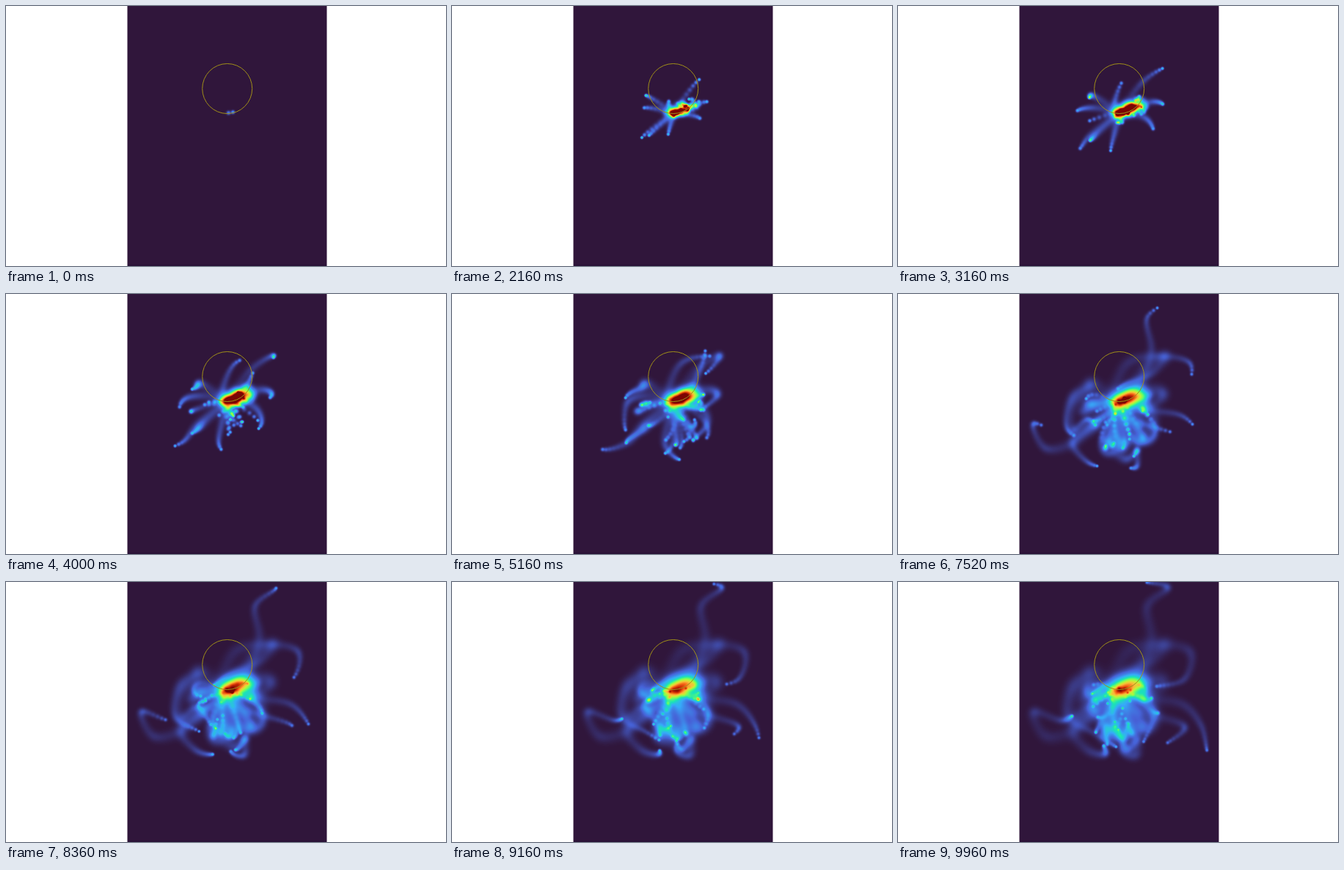
An HTML page with a canvas that plays this animation: 600x354 px, repeating every 10 s.

```html
<!DOCTYPE html>
<html>
<head>
<meta charset="utf-8">
<style>
html, body { margin: 0; width: 100%; height: 100%; overflow: hidden; background: #fff; }
canvas { display: block; }
</style>
</head>
<body>
<canvas id="stage" width="600" height="354"></canvas>
<script>
const ctx = document.getElementById('stage').getContext('2d');
const LEFT = 166, W = 271, H = 354, LOOP = 10, STEP = 0.2;
const NEST = [302, 145], START = 0.36, KNOT = 1.6;

// Explorers: x, y of each ant every 1.6 s after leaving the nest
const routes = [
  [262,175, 239,202, 201,210, 184,176, 221,188, 237,182],
  [317,138, 333,114, 345,75, 339,32, 368,7, 338,0],
  [295,130, 313,93, 355,84, 398,94, 390,132, 350,142],
  [333,103, 365,83, 345,108, 310,122, 283,140, 264,152],
  [312,140, 316,150, 345,158, 388,166, 413,195, 421,230],
  [302,150, 308,163, 318,172, 353,182, 391,197, 365,220],
  [270,174, 258,186, 237,203, 259,229, 282,234, 280,222],
  [263,138, 238,148, 237,186, 259,170, 280,196, 285,222],
  [266,122, 258,127, 236,141, 230,183, 263,203, 297,224],
  [345,130, 362,137, 338,158, 333,155, 349,180, 334,218],
  [337,152, 348,176, 327,202, 325,235, 305,228, 315,190],
  [295,171, 290,205, 310,225, 326,212, 312,228, 300,200]
];

let seed = 11;
const random = () => (seed = seed * 16807 % 2147483647) / 2147483647;

function spline(a, b, c, d, u) {
  return b + u / 2 * (c - a + u * (2 * a - 5 * b + 4 * c - d + u * (3 * (b - c) + d - a)));
}

const deposits = [[303, 145, -0.3], [309, 144, -0.2]];

routes.forEach((route, n) => {
  const flat = NEST.concat(route);
  const knot = (i, axis) => flat[Math.max(0, Math.min(6, i)) * 2 + axis];
  for (let t = START + (n * 0.618 % 1) * STEP; t < LOOP; t += STEP) {
    const s = (t - START) / KNOT, i = Math.min(5, Math.floor(s));
    const at = axis => spline(knot(i - 1, axis), knot(i, axis), knot(i + 1, axis), knot(i + 2, axis), s - i);
    deposits.push([at(0), at(1), t]);
  }
});

// Foragers: looping trips out of the nest and back
for (let n = 0; n < 18; n++) {
  const home = NEST[0] + (random() - 0.5) * 20;
  let begin = 0.4 + n * 0.09, t = begin;
  for (let trip = 0; begin < LOOP; trip++) {
    const angle = trip ? random() * 3.6 - 0.3 : -0.35 + (random() - 0.5) * 0.6;
    const reach = trip ? 25 + random() * 15 + 35 * Math.max(0, Math.sin(angle)) : 22 + random() * 8;
    const bend = (random() - 0.5) * reach * 0.5, duration = reach / 14;
    for (; t < Math.min(begin + duration, LOOP); t += STEP) {
      const f = (t - begin) / duration;
      const out = reach * Math.sin(Math.PI * f), side = bend * Math.sin(2 * Math.PI * f);
      deposits.push([
        home + out * Math.cos(angle) - side * Math.sin(angle),
        NEST[1] + out * Math.sin(angle) + side * Math.cos(angle),
        t
      ]);
    }
    begin += duration;
  }
}

// Rainbow heat scale, packed as opaque little-endian pixels
const stops = [0x30163b, 0x4662d7, 0x36aaf9, 0x1ae4b6, 0x72fe5e, 0xc8ef34, 0xfaba39, 0xf66b19, 0xcb2a04, 0x7a0403];
const palette = Uint32Array.from({ length: 512 }, (_, k) => {
  const s = k / 512 * 9, i = Math.floor(s);
  const mix = shift => {
    const a = stops[i] >> shift & 255, b = stops[i + 1] >> shift & 255;
    return Math.round(a + (b - a) * (s - i));
  };
  return (255 << 24 | mix(0) << 16 | mix(8) << 8 | mix(16)) >>> 0;
});

const heat = new Float32Array(W * H);
const image = ctx.createImageData(W, H);
const pixels = new Uint32Array(image.data.buffer);
const rowWeight = new Float32Array(W);

function spread(x, y, age) {
  const variance = 1.3 + 7 * age, radius = 3 * Math.sqrt(variance);
  const x0 = Math.max(0, Math.ceil(x - radius)), x1 = Math.min(W - 1, Math.floor(x + radius));
  const y0 = Math.max(0, Math.ceil(y - radius)), y1 = Math.min(H - 1, Math.floor(y + radius));
  const bell = d => Math.exp(-d * d / (2 * variance));
  const peak = 2.6 / (2 * Math.PI * variance);
  for (let i = x0; i <= x1; i++) rowWeight[i] = bell(i - x);
  for (let j = y0; j <= y1; j++) {
    const weight = peak * bell(j - y);
    for (let i = x0; i <= x1; i++) heat[j * W + i] += weight * rowWeight[i];
  }
}

function draw(t) {
  heat.fill(0);
  for (const [x, y, born] of deposits) if (born <= t) spread(x - LEFT, y, t - born);
  const gain = (1.25 - 0.055 * t) * 512;
  for (let i = 0; i < pixels.length; i++) pixels[i] = palette[Math.min(511, heat[i] * gain | 0)];

  ctx.fillStyle = '#fff';
  ctx.fillRect(0, 0, 600, H);
  ctx.fillStyle = '#30163b';
  ctx.fillRect(165.5, 0, 272, H);
  ctx.putImageData(image, LEFT, 0);
  ctx.fillStyle = 'rgba(20,0,40,0.25)';
  ctx.fillRect(LEFT, H - 2, W, 2);
  ctx.strokeStyle = '#a08f18';
  ctx.lineWidth = 1;
  ctx.beginPath();
  ctx.arc(301.7, 112.5, 34, 0, 2 * Math.PI);
  ctx.stroke();
}

let shown = -1;
function tick() {
  const step = Math.floor(performance.now() % (LOOP * 1000) / 40);
  if (step !== shown) draw((shown = step) * 0.04);
  requestAnimationFrame(tick);
}
tick();
</script>
</body>
</html>
```
